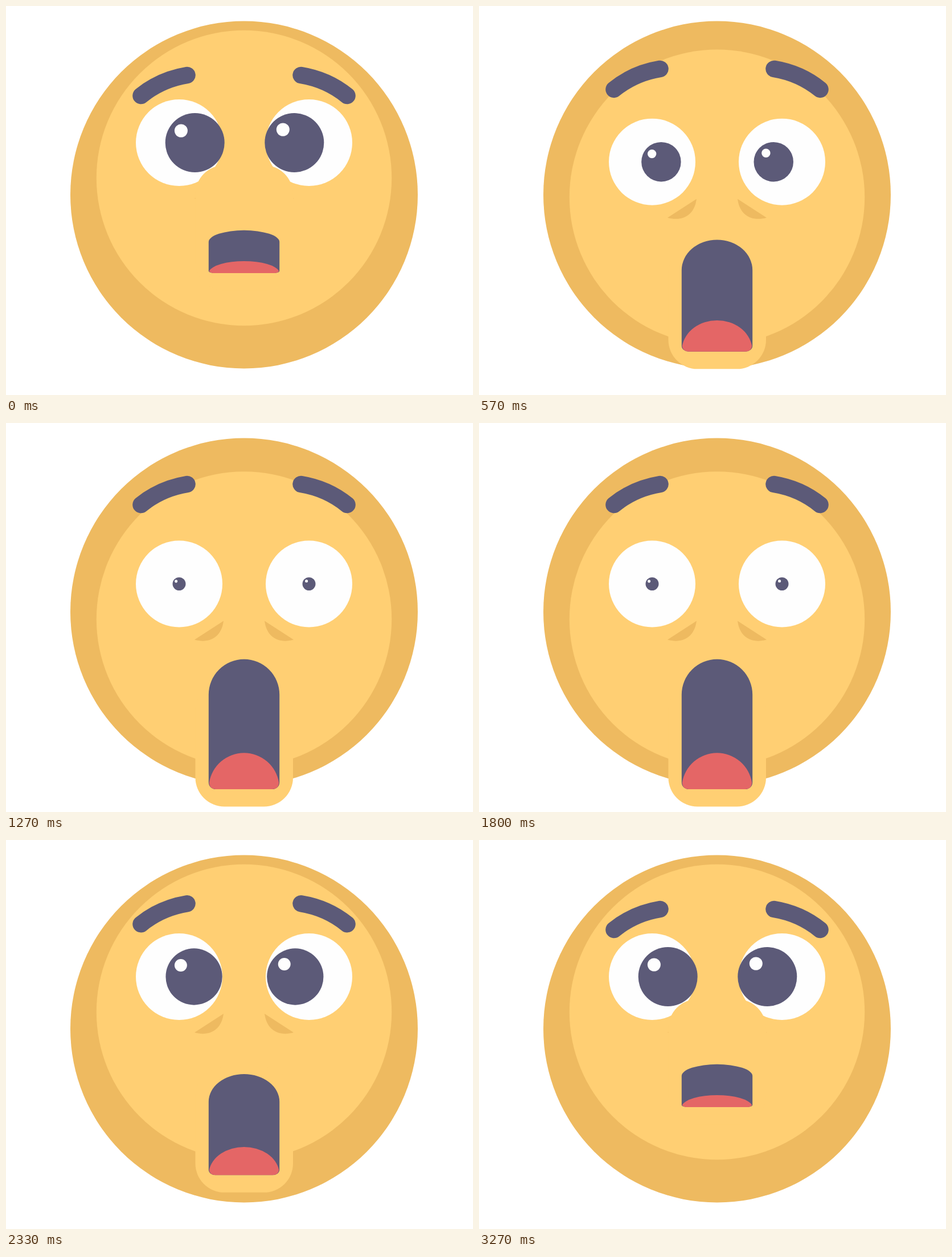
Write an HTML page that moves like this. It is 820x683 px and loops after 3.6 s.

```html
<!DOCTYPE html>
<html lang="en">
<head>
<meta charset="utf-8">
<title>Shocked face</title>
<style>
html, body { margin: 0; width: 100%; height: 100%; overflow: hidden; background: #fff; }
svg { display: block; width: 100%; height: 100%; }
.shade { fill: #eeba60; }
.skin { fill: #ffcf73; }
.dark { fill: #5c5a78; }
.white { fill: #fefefe; }
.brow { fill: none; stroke: #5c5a78; stroke-width: 29.5; stroke-linecap: round; }
</style>
</head>
<body>
<svg viewBox="0 0 820 683">
  <circle class="shade" cx="418" cy="331.5" r="305"/>
  <g id="face">
    <circle class="skin" cx="418" cy="302" r="259.2"/>
    <path class="shade" d="M382 305L331 338C356 345 378 335 382 305ZM454 305L505 338C480 345 458 335 454 305Z"/>
    <circle class="white" cx="304" cy="240" r="76"/>
    <circle class="white" cx="532" cy="240" r="76"/>
    <g id="left">
      <circle class="dark" r="52"/>
      <circle class="white" cx="-24.3" cy="-21" r="11.5"/>
    </g>
    <g id="right">
      <circle class="dark" r="52"/>
      <circle class="white" cx="-20" cy="-23" r="11.5"/>
    </g>
  </g>
  <rect id="chin" class="skin" x="332.5" width="171.5" height="220" rx="51"/>
  <g id="brows" class="brow">
    <path d="M237 157.5Q272 129 318 121.5"/>
    <path d="M599 157.5Q564 129 518 121.5"/>
  </g>
  <g id="mouth">
    <path class="dark" d="M-62.2 -52A62.2 62.2 0 0 1 62.2 -52V102A12 12 0 0 1 50 114H-50A12 12 0 0 1 -62.2 102Z"/>
    <path fill="#e46666" d="M-61.3 103A62 62 0 0 1 61.3 103Q60 114 50 114H-50Q-60 114 -61.3 103Z"/>
  </g>
</svg>
<script>
const LOOP = 3600;
const $ = id => document.getElementById(id);
const clamp = x => Math.min(1, Math.max(0, x));
const easeOut = x => 1 - (1 - x) ** 3;
const easeInOut = x => (1 - Math.cos(Math.PI * x)) / 2;
const mix = (a, b, k) => a + (b - a) * k;

// 0 = calm, 1 = shocked: quick rise at `start`, softer return at `back`
const shock = (t, start, back, length) =>
  easeOut(clamp((t - start) / 420)) - easeInOut(clamp((t - back) / length));

const place = (id, x, y, sx = 1, sy = sx) =>
  $(id).setAttribute('transform', `translate(${x} ${y}) scale(${sx} ${sy})`);

function draw(t) {
  const face = shock(t, 400, 1800, 425);
  const eyes = shock(t, 500, 1972, 425);
  const drop = shock(t, 400, 2059, 738);
  const open = shock(t, 400, 2060, 692);

  place('face', 0, 42.5 * face);
  place('brows', 0, -14 * drop);

  const pupil = mix(1, 0.221, eyes);
  place('left', mix(331.7, 304, eyes), 240, pupil);
  place('right', mix(506.3, 532, eyes), 240, pupil);

  const middle = mix(431.5, 529, drop);
  const half = mix(37.6, 114, open);
  place('mouth', 418, middle, 1, half / 114);
  $('chin').setAttribute('y', middle + half + 30.5 - 220);
}

const begin = performance.now();
function tick() {
  draw((performance.now() - begin) % LOOP);
  requestAnimationFrame(tick);
}
tick();
</script>
</body>
</html>
```
